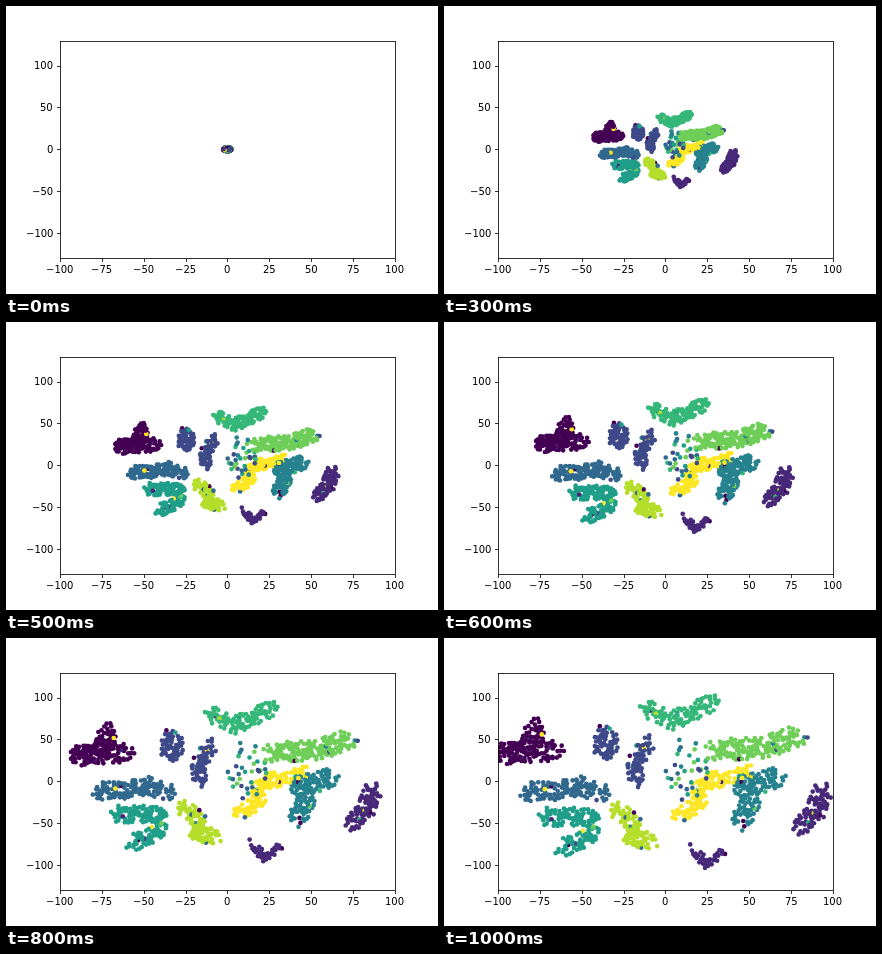
An HTML page with a canvas that plays this animation: 432x288 px, repeating every 1.1 s.

```html
<!DOCTYPE html>
<html lang="en">
<meta charset="utf-8">
<title>Growing scatter plot</title>
<style>
  html, body { margin: 0; width: 100%; height: 100%; overflow: hidden; background: #fff; }
  canvas { display: block; }
</style>
<canvas id="stage" width="432" height="288"></canvas>
<script>
const ctx = document.getElementById('stage').getContext('2d');
const CX = 221.4, CY = 143.28, UNIT_X = 1.674, UNIT_Y = 0.8363;
const STEP = 100, STEPS = 11, DOT = 2.33;
const COLORS = '#440154 #482878 #3e4989 #31688e #26828e #1f9e89 #35b779 #6ece58 #b5de2b #fde725'.split(' ');

// Clusters are bands around a few key points of the final layout.
// drift bends a cluster's way sideways while it spreads.
const CLUSTERS = [
  { color: 0, width: 11, drift: 8, path: [[92, 90], [88, 106], [60, 116], [110, 112]] },
  { color: 1, width: 11, drift: 0, path: [[380, 153], [372, 174], [359, 187]] },
  { color: 1, width: 5, drift: -10, path: [[249, 209], [261, 226], [278, 215]] },
  { color: 2, width: 12, drift: -6, path: [[161, 96], [162, 113]] },
  { color: 2, width: 9, drift: -8, path: [[204, 104], [192, 122], [192, 142]] },
  { color: 3, width: 10, drift: -10, path: [[84, 154], [112, 153], [134, 148], [160, 155]] },
  { color: 4, width: 11, drift: 2, path: [[332, 140], [300, 148], [306, 168], [297, 183]] },
  { color: 5, width: 10, drift: 8, path: [[102, 178], [145, 180], [148, 196], [120, 211]] },
  { color: 6, width: 9, drift: 13, path: [[203, 71], [228, 83], [270, 63]] },
  { color: 7, width: 11, drift: -14, path: [[270, 112], [318, 110], [354, 98]] },
  { color: 8, width: 9, drift: 13, path: [[172, 171], [190, 182], [188, 200], [208, 203]] },
  { color: 9, width: 9, drift: 0, path: [[306, 136], [258, 145], [254, 166], [236, 177]] }
];

let seed = 7;
function rand() {
  seed = (seed * 1664525 + 1013904223) % 4294967296;
  return seed / 4294967296;
}

function inEllipse(x, y, rx, ry) {
  const a = rand() * 2 * Math.PI, r = Math.sqrt(rand());
  return [x + rx * r * Math.cos(a), y + ry * r * Math.sin(a)];
}

const points = [];

function addPoint([x, y], color, drift) {
  points.push({ x, y, drift, color: COLORS[color], start: inEllipse(0, 0, 4.2, 1.9), order: rand() });
}

function pointAlong(path, distance) {
  for (let i = 1; i < path.length; i++) {
    const [x, y] = path[i - 1], dx = path[i][0] - x, dy = path[i][1] - y;
    const length = Math.hypot(dx, dy);
    if (distance <= length) return [x + dx * distance / length, y + dy * distance / length];
    distance -= length;
  }
  return path[path.length - 1];
}

// Leaves small gaps, so that the clusters look clumpy.
const isGap = ([x, y]) => Math.sin(x * .4 + y * .2) + Math.sin(y * .5 - x * .2) < -.7;
const isCrowded = ([x, y]) => points.some(p => Math.hypot(p.x - x, p.y - y) < 2.5);

function fillCluster({ color, width, drift, path }) {
  const length = path.slice(1).reduce((sum, [x, y], i) => sum + Math.hypot(x - path[i][0], y - path[i][1]), 0);
  const count = (length * 2 + Math.PI * width) * width / 16;
  for (let i = 0; i < count; i++) {
    let p, tries = 0;
    do p = inEllipse(...pointAlong(path, rand() * length), width, width);
    while (tries++ < 12 && (isGap(p) || isCrowded(p)));
    addPoint(p, rand() < .04 ? Math.floor(rand() * 10) : color, drift);
  }
}

CLUSTERS.forEach(fillCluster);
// Loose dots between the clusters
for (let i = 0; i < 36; i++) addPoint(inEllipse(242, 132, 22, 32), 2 + i % 6, 0);
points.sort((a, b) => a.order - b.order);

function drawPoints(s) {
  ctx.save();
  ctx.beginPath();
  ctx.rect(54, 34.56, 334.8, 217.44);
  ctx.clip();
  for (const p of points) {
    const [x, y] = s
      ? [s * (p.x - CX) + s * (1 - s) * p.drift, s * (p.y - CY)]
      : p.start;
    ctx.fillStyle = p.color;
    ctx.beginPath();
    ctx.arc(CX + x, CY + y, DOT, 0, 2 * Math.PI);
    ctx.fill();
  }
  ctx.restore();
}

function line(x1, y1, x2, y2) {
  ctx.beginPath();
  ctx.moveTo(x1, y1);
  ctx.lineTo(x2, y2);
  ctx.stroke();
}

// align: share of the text's width that lies left of x
function label(value, x, y, align) {
  const text = String(value).replace('-', '\u2212');
  ctx.fillText(text, Math.round(x - ctx.measureText(text).width * align), Math.round(y));
}

function drawAxes() {
  const snap = v => Math.round(v) + .5;
  ctx.lineWidth = .8;
  ctx.strokeStyle = ctx.fillStyle = '#000';
  ctx.font = '10px "DejaVu Sans", sans-serif';
  ctx.strokeRect(54.5, 35.5, 335, 217);
  for (let v = -100; v <= 100; v += 25) {
    const x = CX + v * UNIT_X;
    line(snap(x), 252.5, snap(x), 256);
    label(v, x, 267, .5);
  }
  for (let v = -100; v <= 100; v += 50) {
    const y = CY - v * UNIT_Y;
    line(51, snap(y), 54.5, snap(y));
    label(v, 47, y + 3.8, 1);
  }
}

function draw(now) {
  const step = Math.floor(now / STEP) % STEPS;
  ctx.fillStyle = '#fff';
  ctx.fillRect(0, 0, 432, 288);
  drawPoints(1 - (1 - step / (STEPS - 1)) ** 1.6);
  drawAxes();
  requestAnimationFrame(draw);
}
requestAnimationFrame(draw);
</script>
</html>
```
